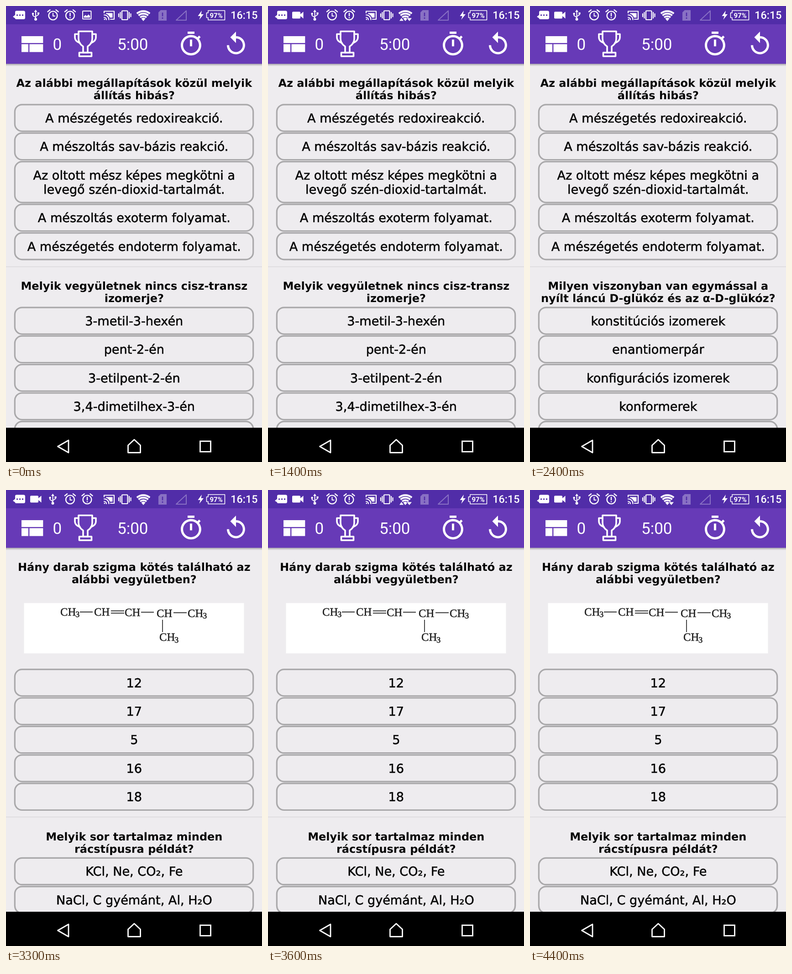
Recreate the animation shown at these times as an HTML page. Size 561 by 998 pixels, loop 4.5 s.

```html
<!DOCTYPE html>
<html lang="hu">
<head>
<meta charset="utf-8">
<title>Kémia kvíz</title>
<style>
  html, body { margin: 0; width: 100%; height: 100%; overflow: hidden; background: #eeecef; }
  svg { display: block; width: 100vw; height: 100vh; }
  text { white-space: pre; text-rendering: geometricPrecision; }
  .title, .answer { font-family: "DejaVu Sans", sans-serif; text-anchor: middle; fill: #050505; }
  .title { font-size: 24px; font-weight: 700; }
  .answer { font-size: 27.1px; stroke: #050505; stroke-width: .55; }
  .box { fill: none; stroke: #a9a8aa; stroke-width: 3.2; }
  .rule { fill: #d6d4d7; }
  .ui { font-family: Roboto, sans-serif; fill: #fff; }
  .formula { font-family: "Liberation Serif", serif; font-size: 24.6px; fill: #222; stroke: #222; stroke-width: .6; }
  .sub { font-size: 18px; }
  .line { fill: none; stroke: #fff; stroke-linecap: round; stroke-linejoin: round; }
  .dim { opacity: .32; }
</style>
</head>
<body>
<svg viewBox="0 0 561 998" preserveAspectRatio="none">
  <defs>
    <linearGradient id="shade" x2="0" y2="1">
      <stop offset="0" stop-color="#000" stop-opacity=".3"/>
      <stop offset="1" stop-color="#000" stop-opacity="0"/>
    </linearGradient>
    <g id="clock" class="line" stroke-width="2.4">
      <circle cy="1" r="9.4"/>
      <path d="M-11.5-7.5l5-4M11.5-7.5l-5-4"/>
    </g>
  </defs>

  <rect width="561" height="998" fill="#eeecef"/>
  <g id="page"></g>

  <rect y="126" width="561" height="6" fill="url(#shade)"/>
  <rect width="561" height="40" fill="#512da8"/>
  <rect y="40" width="561" height="86.5" fill="#673ab7"/>

  <!-- toolbar -->
  <g fill="#fff">
    <path transform="translate(26.5 53.5) scale(2.49)" d="M3 19h6v-7H3zM10 19h12v-7H10zM3 5v6h19V5z"/>
    <path transform="translate(375.6 53.5) scale(2.49)" d="M15 1H9v2h6V1zm-4 13h2V8h-2v6zm8.03-6.61l1.42-1.42c-.43-.51-.9-.99-1.41-1.41l-1.42 1.42C16.07 4.74 14.12 4 12 4c-4.97 0-9 4.03-9 9s4.02 9 9 9 9-4.03 9-9c0-2.12-.74-4.07-1.97-5.61zM12 20c-3.87 0-7-3.13-7-7s3.13-7 7-7 7 3.13 7 7-3.13 7-7 7z"/>
    <path transform="translate(474.1 53.5) scale(2.49)" d="M12 5V1L7 6l5 5V7c3.31 0 6 2.69 6 6s-2.69 6-6 6-6-2.69-6-6H4c0 4.42 3.58 8 8 8s8-3.58 8-8-3.58-8-8-8z"/>
  </g>
  <g class="line" stroke-width="3.6">
    <path d="M159 55.5H189V72Q189 82 179 88.500V102H169V88.500Q159 82 159 72Z"/>
    <path d="M159 61.500H151V69Q151 77 162 81M189 61.500H197V69Q197 77 186 81"/>
    <path d="M160.500 102H187.500V110H160.500Z"/>
  </g>
  <text class="ui" x="102.500" y="96" font-size="35">0</text>
  <text class="ui" x="244" y="96" font-size="35">5:00</text>

  <!-- status bar -->
  <path d="M23 10.500H38.500Q42 10.500 42 14V25.500Q42 29 38.500 29H23Q20 29 20 27L15 23.500L20 19.500V13.500Q20 10.500 23 10.500Z" fill="#fff"/>
  <g fill="#512da8"><circle cx="24.500" cy="20" r="1.7"/><circle cx="30.500" cy="20" r="1.7"/><circle cx="36.500" cy="20" r="1.7"/></g>
  <path id="camera" fill="#fff" d="M55 12.500H69Q71 12.500 71 14.500V18L77.500 12.500V27.500L71 22V25.500Q71 27.500 69 27.500H55Q53 27.500 53 25.500V14.500Q53 12.500 55 12.500Z"/>
  <g id="image">
    <rect class="line" x="168" y="11" width="18.500" height="17.500" rx="1" stroke-width="2"/>
    <path d="M170.500 25.500V23L174 19.500L177 22L181 18.500L184 22V25.500Z" fill="#fff"/>
  </g>
  <g id="early"></g>
  <g id="late"></g>

  <g class="line" stroke-width="2.2">
    <path d="M215 15V11.500H237V29H229M215 25A5 5 0 0 1 220 30M215 19.500A10.500 10.500 0 0 1 225.500 30"/>
    <rect x="254" y="10.500" width="12.500" height="19.500" rx="1.5"/>
    <path d="M250.500 14V26.500M247 17V23.500M270 14V26.500M273.500 17V23.500"/>
  </g>
  <path d="M219 15.500H233.500V25.500H228Q225 18.500 219 17Z" fill="#fff"/>
  <circle cx="216" cy="29" r="1.5" fill="#fff"/>
  <g transform="translate(301 33)">
    <path d="M0 0L-4.6-5.6A7.2 7.2 0 0 1 4.6-5.6Z" fill="#fff"/>
    <g id="arcs" fill="none" stroke="#fff" stroke-width="3.9"></g>
  </g>
  <g fill="#fff" stroke="#512da8" stroke-width="1.6" paint-order="stroke">
    <path id="up" d="M288 32.500L292.500 26L297 32.500Z"/>
    <path id="down" d="M304.500 26.500H315L309.750 33Z"/>
  </g>
  <g class="dim">
    <path d="M339 9H352V32H334V14Z" fill="#fff"/>
    <path d="M373 31L395 10.500V31Z" class="line" stroke-width="2"/>
  </g>
  <path d="M343 14.500V22.500M343 25V28" stroke="#512da8" stroke-width="2.6"/>
  <path d="M429 10L420.500 22H426L423.500 30L433 18H427.500Z" fill="#fff"/>
  <path class="line" stroke-width="1.600" d="M443 10H479.500V30.500H443V25.500H439.500V15H443Z"/>
  <text class="ui" x="446.500" y="25.800" font-size="15" font-weight="700">97%</text>
  <text class="ui" x="492.300" y="28.300" font-size="23.300" font-weight="500">16:15</text>

  <!-- navigation bar -->
  <rect y="923" width="561" height="75" fill="#000"/>
  <g class="line" stroke-width="2.800">
    <path d="M113.500 964L137 950.500V977.500Z"/>
    <path d="M281 949L294.500 961.500V977.500H267.500V961.500Z"/>
    <rect x="425.500" y="952.500" width="23" height="23" stroke-linejoin="miter"/>
  </g>
</svg>

<script>
const LOOP = 4500, LINE = 31.2, STEP = 62.4;
const $ = id => document.getElementById(id);

const text = (cls, y, s) => `<text class="${cls}" x="280.800" y="${y}">${s}</text>`;

// One answer button; "|" splits its lines.
function answer(y, label) {
  const lines = label.split("|");
  const h = STEP - 4.1 + (lines.length - 1) * LINE;
  return `<rect class="box" x="19.300" y="${y + 1.6}" width="522.400" height="${h}" rx="16"/>` +
    lines.map((s, i) => text("answer", y + 40.6 + i * LINE, s)).join("");
}

function question(y, title, top, labels) {
  let out = title.split("|").map((s, i) => text("title", y + i * 27, s)).join("");
  for (const label of labels) {
    out += answer(top, label);
    top += STEP + (label.split("|").length - 1) * LINE;
  }
  return out;
}

const rule = y => `<rect class="rule" y="${y}" width="561" height="1.200"/>`;

const group = (x, y, three) => `<text class="formula" x="${x}" y="${y}">CH` +
  (three ? `<tspan class="sub" dy="3.500" dx="-1">3</tspan>` : "") + `</text>`;

const molecule =
  `<rect x="39.500" y="247.500" width="482" height="110" fill="#fff"/>` +
  group(119, 274.5, true) + group(193, 274.5) + group(260, 275.5) +
  group(330, 277.5) + group(398, 277.5, true) + group(336, 330, true) +
  `<path d="M162 267H190M230 264.500H259M230 269.500H259M296 267.500H324M367 268.500H396M343 284V311"
    fill="none" stroke="#333" stroke-width="1.800"/>`;

const scenes = {
  lime: question(177, "Az alábbi megállapítások közül melyik|állítás hibás?", 214.2, [
    "A mészégetés redoxireakció.", "A mészoltás sav-bázis reakció.",
    "Az oltott mész képes megkötni a|levegő szén-dioxid-tartalmát.",
    "A mészoltás exoterm folyamat.", "A mészégetés endoterm folyamat."]) + rule(570),
  isomer: question(621, "Melyik vegyületnek nincs cisz-transz|izomerje?", 658.2, [
    "3-metil-3-hexén", "pent-2-én", "3-etilpent-2-én", "3,4-dimetilhex-3-én", ""]),
  glucose: question(621, "Milyen viszonyban van egymással a|nyílt láncú D-glükóz és az α-D-glükóz?", 658.2, [
    "konstitúciós izomerek", "enantiomerpár", "konfigurációs izomerek", "konformerek", ""]),
  sigma: question(177, "Hány darab szigma kötés található az|alábbi vegyületben?", 391,
    ["12", "17", "5", "16", "18"]) + molecule + rule(715) +
    question(767, "Melyik sor tartalmaz minden|rácstípusra példát?", 803.8,
      ["KCl, Ne, CO₂, Fe", "NaCl, C gyémánt, Al, H₂O"])
};
$("page").innerHTML = Object.entries(scenes)
  .map(([id, body]) => `<g id="${id}">${body}</g>`).join("");

// USB plug and two alarms, which move right when the camera appears.
const notices = x =>
  `<g transform="translate(${x} 20)">
    <path class="line" stroke-width="2" d="M0-8V8M-6-3V1L0 5M6-4V-1L0 3"/>
    <path d="M-3.500-7L0-12L3.500-7Z" fill="#fff"/>
    <circle cy="9" r="3" fill="#fff"/><circle cx="-6" cy="-3" r="2.200" fill="#fff"/>
    <rect x="4" y="-6" width="4" height="4" fill="#fff"/></g>
  <use href="#clock" x="${x + 38}" y="20"/>
  <path class="line" stroke-width="2" d="M${x + 38} 16V22H${x + 42}"/>
  <use href="#clock" x="${x + 75.5}" y="20"/>
  <path class="line" stroke-width="2.400" d="M${x + 75.5} 16V21.500M${x + 75.5} 25.500V25.700"/>`;
$("early").innerHTML = notices(65);
$("late").innerHTML = notices(102.5);

$("arcs").innerHTML = [10.6, 16.2, 21.8].map(r => {
  const x = r * 0.65, y = -r * 0.76;
  return `<path d="M${-x} ${y}A${r} ${r} 0 0 1 ${x} ${y}"/>`;
}).join("");

// Visible spans in ms: [id, from, to, from, to, ...]
const spans = [
  ["early", 0, 100], ["image", 0, 100],
  ["late", 100, LOOP], ["camera", 100, LOOP],
  ["lime", 0, 3300], ["isomer", 0, 1900], ["glucose", 1900, 3300], ["sigma", 3300, LOOP],
  ["up", 1400, 2400, 3600, 4400], ["down", 1400, 2400, 3600, LOOP]
];
for (const [id, ...times] of spans) {
  const frames = times[0] ? [{ offset: 0, opacity: 0 }] : [];
  times.forEach((t, i) => frames.push({ offset: t / LOOP, opacity: i % 2 ? 0 : 1 }));
  if (frames.at(-1).offset < 1) frames.push({ offset: 1, opacity: 0 });
  frames.forEach(f => f.easing = "step-end");
  $(id).animate(frames, { duration: LOOP, iterations: Infinity });
}
</script>
</body>
</html>
```
